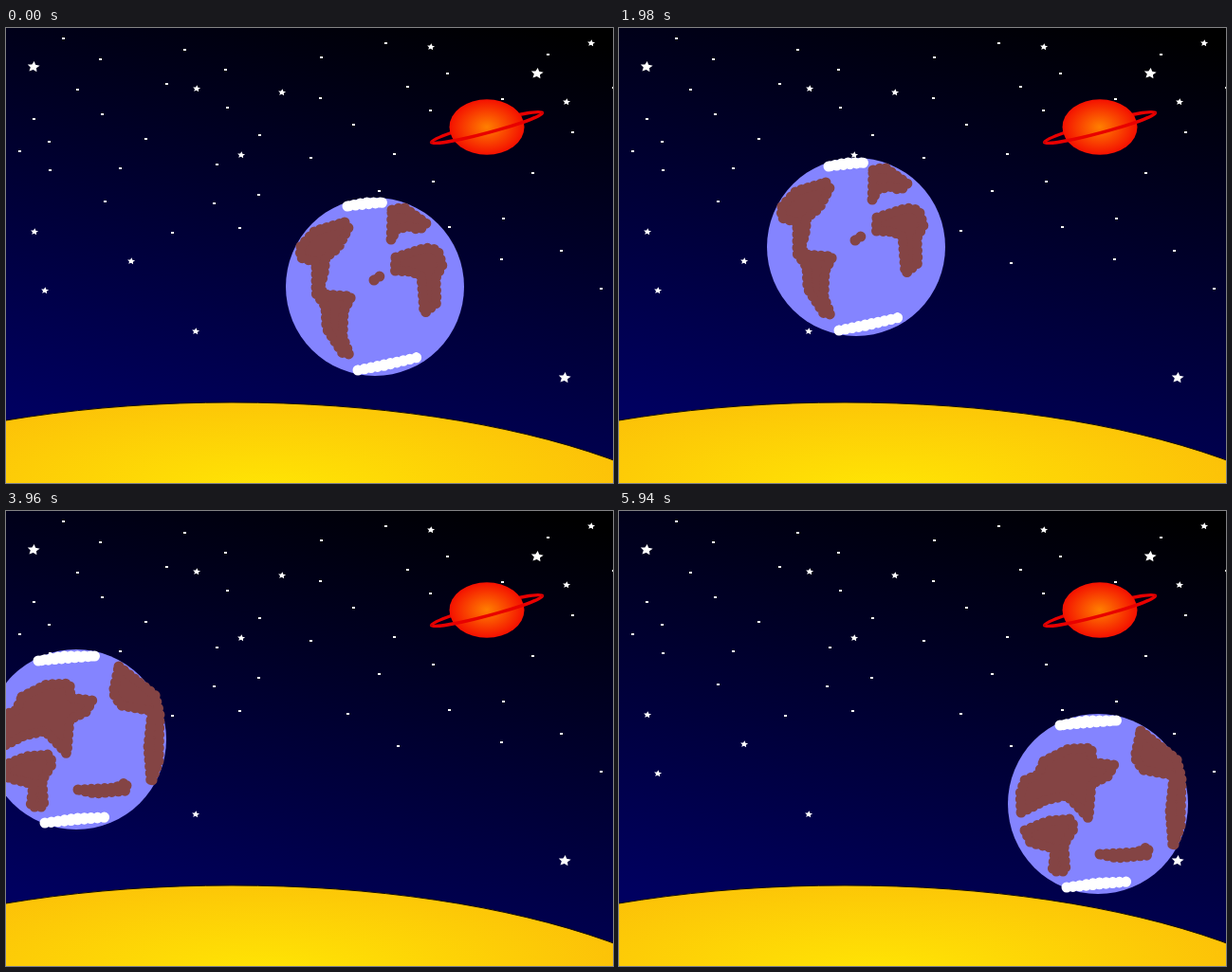
An HTML page with a canvas for the animation above (6600 ms loop, 640 by 480 pixels).

```html
<!DOCTYPE html>
<html lang="en">
<head>
<meta charset="utf-8">
<title>Planet in space</title>
<style>
html, body { margin: 0; width: 100%; height: 100%; overflow: hidden; background: #000; }
canvas { display: block; }
</style>
</head>
<body>
<canvas id="stage" width="640" height="480"></canvas>
<script>
const ctx = document.getElementById('stage').getContext('2d');
const TAU = Math.PI * 2;
const STEP = 660;
const SEA = '#8484ff', LAND = '#844444', ICE = '#ffffff';

const bigStars = [[29,41], [560,48], [589,369]];
const midStars = [
  [448,20], [617,16], [591,78], [201,64], [291,68],
  [248,134], [30,215], [132,246], [41,277], [200,320]
];

// Brush outlines of the two sides of the globe, each around its own centre
const atlantic = {
  cx: 389, cy: 273, r: 94,
  land: [
    '357,205 361,211 350,232 337,242 335,260 331,273 335,281 364,283 356,299 355,326 362,344 355,343 338,317 337,294 327,280 327,247 310,242 311,230 326,214',
    '407,192 419,189 443,206 436,213 424,209 411,213 406,224',
    '411,242 442,232 455,234 460,250 453,264 454,290 441,301 438,262 428,257 410,256',
    '388,266 394,262'
  ],
  ice: ['360,188 378,184 399,184', '371,361 400,356 436,347']
};
const pacific = {
  cx: 345, cy: 247, r: 95,
  land: [
    '288,202 314,189 338,188 339,203 362,206 355,218 338,226 335,262 324,250 312,238 290,243 264,256 263,236 268,222 282,216',
    '268,275 292,265 316,263 320,272 309,290 311,318 297,318 300,294 274,288',
    '347,300 386,298 398,292 398,301 365,304',
    '390,170 428,200 433,220 432,270 424,293 421,255 425,217 392,211 384,198'
  ],
  ice: ['305,164 330,159 366,159', '312,335 345,330 378,329']
};

// One pose per step: side, centre x, centre y
const poses = [
  [atlantic, 389, 273], [pacific, 375, 273], [pacific, 345, 247], [atlantic, 250, 231],
  [pacific, 232, 232], [atlantic, 137, 224], [pacific, 74, 241], [pacific, -28, 274],
  [atlantic, 666, 353], [pacific, 505, 309]
];

const random = n => {
  const v = Math.sin(n * 12.9898) * 43758.5453;
  return v - Math.floor(v);
};

// Fills an outline and dabs a round brush along its edge.
function daub(points, color) {
  ctx.beginPath();
  points.split(' ').forEach(p => ctx.lineTo(...p.split(',').map(Number)));
  ctx.closePath();
  ctx.fillStyle = ctx.strokeStyle = color;
  ctx.lineWidth = 11;
  ctx.lineCap = 'round';
  ctx.setLineDash([0, 7]);
  ctx.fill();
  ctx.stroke();
}

function star(x, y, r) {
  ctx.beginPath();
  for (let i = 0; i < 10; i++) {
    const a = i * TAU / 10 - TAU / 4 + 0.1;
    const d = i % 2 ? r * 0.48 : r;
    ctx.lineTo(x + d * Math.cos(a), y + d * 0.9 * Math.sin(a));
  }
  ctx.fill();
}

function drawSky() {
  const g = ctx.createLinearGradient(33, -132, -94, 376);
  g.addColorStop(0, '#000000');
  g.addColorStop(1, '#000060');
  ctx.fillStyle = g;
  ctx.fillRect(0, 0, 640, 480);
  ctx.fillStyle = '#fff';
  const count = 45;
  for (let i = 0; i < count; i++) {
    const x = 640 * ((i * 0.618 + random(i + 1) * 0.1) % 1);
    const y = 8 + (i + random(i + 99)) / count * (180 + x * 0.16);
    ctx.fillRect(Math.round(x), Math.round(y), 3, 2);
  }
  midStars.forEach(([x, y]) => star(x, y, 4.2));
  bigStars.forEach(([x, y]) => star(x, y, 6.8));
}

// Ellipse shaded from its own glow centre, squashed by the same ratio
function shade(x, y, radius, squash, inner, outer) {
  ctx.translate(x, y);
  ctx.scale(1, squash);
  const g = ctx.createRadialGradient(0, 0, 0, 0, 0, radius);
  g.addColorStop(0, inner);
  g.addColorStop(1, outer);
  ctx.fillStyle = g;
}

function drawSun() {
  ctx.save();
  shade(275, 490, 400, 0.29, '#ffe604', '#fcc008');
  ctx.beginPath();
  ctx.ellipse(238 - 275, (595 - 490) / 0.29, 560, 200 / 0.29, 0, 0, TAU);
  ctx.fill();
  ctx.restore();
  ctx.beginPath();
  ctx.ellipse(238, 595, 560, 200, 0, 0, TAU);
  ctx.strokeStyle = '#181000';
  ctx.lineWidth = 1;
  ctx.stroke();
}

function drawRing(from, to) {
  ctx.beginPath();
  ctx.ellipse(507, 105, 60.5, 5.5, -0.26, from, to);
  ctx.strokeStyle = '#e80000';
  ctx.lineWidth = 3.4;
  ctx.stroke();
}

function drawRingedPlanet() {
  drawRing(TAU / 2, TAU);
  ctx.save();
  shade(507, 104.5, 39.5, 0.74, '#ff8000', '#f41000');
  ctx.beginPath();
  ctx.arc(0, 0, 39.5, 0, TAU);
  ctx.fill();
  ctx.restore();
  drawRing(0, TAU / 2);
}

function drawGlobe(side, x, y) {
  ctx.save();
  ctx.translate(x - side.cx, y - side.cy);
  ctx.beginPath();
  ctx.arc(side.cx, side.cy, side.r, 0, TAU);
  ctx.fillStyle = SEA;
  ctx.fill();
  side.land.forEach(p => daub(p, LAND));
  side.ice.forEach(p => daub(p, ICE));
  ctx.restore();
}

function frame() {
  const step = Math.floor(performance.now() / STEP) % poses.length;
  drawSky();
  drawRingedPlanet();
  drawSun();
  drawGlobe(...poses[step]);
  requestAnimationFrame(frame);
}
frame();
</script>
</body>
</html>
```
